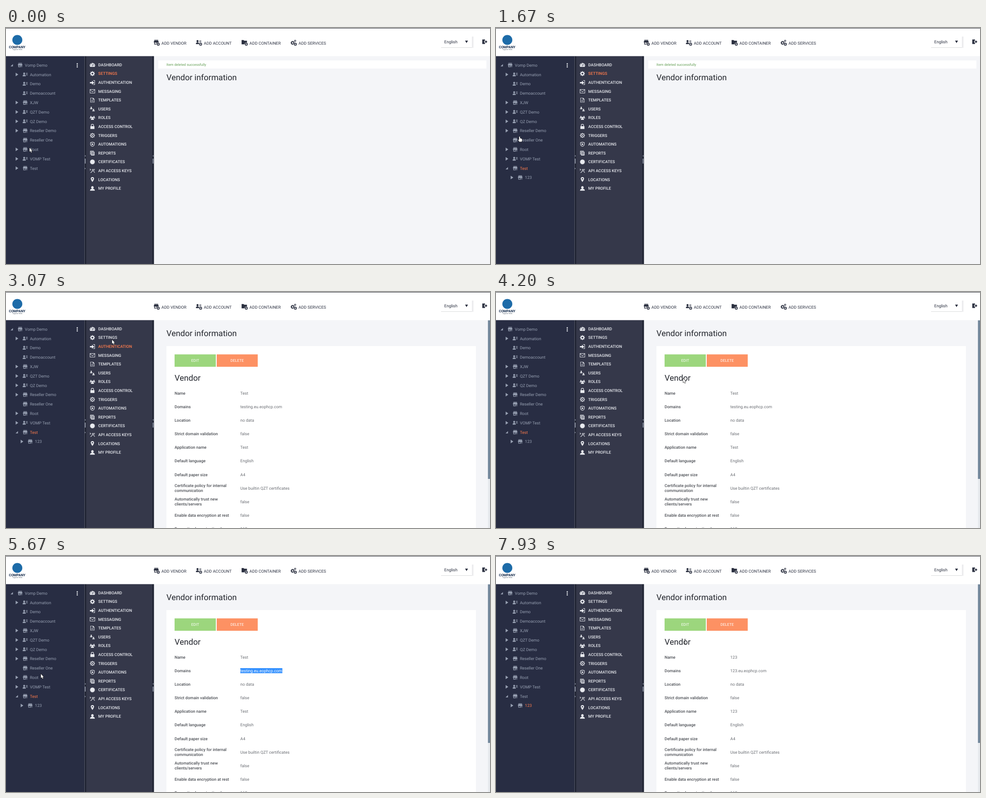
These frames come from a looping animation (1068 px wide and 524 px high, 8000 ms). An HTML page with a canvas:

```html
<!DOCTYPE html>
<html lang="en">
<head>
<meta charset="utf-8">
<title>Vendor console</title>
<style>
html, body { margin: 0; width: 100%; height: 100%; overflow: hidden; background: #f4f5f8; }
canvas { display: block; }
</style>
</head>
<body>
<canvas id="stage" width="1068" height="524"></canvas>
<script>
const ctx = document.getElementById('stage').getContext('2d');
ctx.textRendering = 'geometricPrecision';
const LOOP = 8000, FPS = 15;
const ORANGE = '#ff7c4d', TREE = '#97a0b2', MENU = '#e8eaef', DARK = '#2b3040';
const TOP = 62.5;

// When things switch, in ms
const EXPAND = 1200, OPEN = 2260, PICK = 6260, RELOAD = 6590;
const DRAG = [4530, 4860];

// Pointer track: time, x, y, shape
const track = [
  [0, 52, 266, 'arrow'], [133, 54, 247, 'hand'], [267, 54, 247, 'hand'],
  [600, 23, 244, 'hand'], [733, 23, 244, 'hand'], [1000, 17, 242, 'hand'],
  [1133, 17, 242, 'hand'], [1667, 52, 241, 'hand'], [2667, 52, 241, 'arrow'],
  [2800, 84, 195, 'arrow'], [2933, 148, 115, 'arrow'], [3000, 190, 90, 'arrow'],
  [3067, 234, 106, 'arrow'], [3200, 350, 153, 'arrow'], [3333, 350, 153, 'arrow'],
  [3733, 407, 192, 'arrow'], [3867, 408, 192, 'arrow'], [4133, 408, 192, 'arrow'],
  [4200, 413, 192, 'arrow'], [4400, 415, 203, 'beam'], [4533, 415, 203, 'beam'],
  [4867, 489, 203, 'beam'], [5067, 489, 202, 'arrow'], [5133, 465, 193, 'arrow'],
  [5333, 143, 230, 'arrow'], [5467, 143, 230, 'arrow'], [5667, 77, 262, 'arrow'],
  [5867, 59, 260, 'hand'], [6000, 60, 255, 'hand'], [7333, 60, 255, 'arrow'],
  [7533, 424, 214, 'arrow'], [7600, 424, 214, 'arrow'], [7667, 426, 212, 'arrow'],
  [7933, 417, 190, 'beam']
];

function pointerAt(t) {
  let i = track.length - 1;
  while (i > 0 && track[i][0] > t + 2) i--;
  const a = track[i], b = track[i + 1] || a;
  const k = b === a ? 0 : Math.max(0, (t - a[0]) / (b[0] - a[0]));
  return { x: a[1] + (b[1] - a[1]) * k, y: a[2] + (b[2] - a[2]) * k, kind: a[3] };
}

function box(x, y, w, h, color) {
  ctx.fillStyle = color;
  ctx.fillRect(x, y, w, h);
}

// y is the middle of the capitals
function text(s, x, y, color, size = 9.05, weight = 400, align = 'left') {
  ctx.font = `${weight} ${size}px Roboto, sans-serif`;
  ctx.textAlign = align;
  ctx.fillStyle = color;
  ctx.fillText(s, x, y + size * 0.356);
}

function poly(color, ...p) {
  ctx.fillStyle = color;
  ctx.beginPath();
  for (let i = 0; i < p.length; i += 2) ctx.lineTo(p[i], p[i + 1]);
  ctx.fill();
}

function shape(d, x, y, color, scale = 1, outline) {
  const path = new Path2D(d);
  ctx.save();
  ctx.translate(x, y);
  ctx.scale(scale, scale);
  if (outline) {
    ctx.strokeStyle = outline;
    ctx.lineWidth = 1.2;
    ctx.lineJoin = 'round';
    ctx.stroke(path);
  }
  ctx.fillStyle = color;
  ctx.fill(path, 'evenodd');
  ctx.restore();
}

function disc(x, y, r, color) {
  ctx.fillStyle = color;
  ctx.beginPath();
  ctx.arc(x, y, r, 0, 7);
  ctx.fill();
}

function gear(x, y, r, teeth, hole, color, depth = 0.74) {
  ctx.fillStyle = color;
  ctx.beginPath();
  for (let i = 0; i < teeth * 4; i++) {
    const a = (i - 0.5) * Math.PI / teeth / 2;
    const q = i % 4 < 2 ? r : r * depth;
    ctx.lineTo(x + q * Math.cos(a), y + q * Math.sin(a));
  }
  ctx.closePath();
  if (hole) {
    ctx.moveTo(x + hole, y);
    ctx.arc(x, y, hole, 0, 7);
  }
  ctx.fill('evenodd');
}

const P = {
  store: 'M-4-4.8H4V-3.8H-4ZM-4-3.2H4L5-.8V.4H-5V-.8ZM-4.2.4H4.2V4.6H3V1H1.6V4.6H-4.2ZM-3 1V3.2H.4V1Z',
  account: 'M-2.2-4.4a2.1 2.3 0 1 1-.01 0ZM-5.5 4V2.6Q-5.3.6-2.2.4Q1 .6 1.2 2.6V4ZM1.5-3.5H5.5V-2.5H1.5ZM1.5-1.4H5.5V-.4H1.5ZM2 .7H5.5V1.7H2Z',
  person: 'M0-5.2a2.8 3 0 1 1-.01 0ZM-5.2 5.2V3.6Q-4.8 1.4-1.6.9H1.6Q4.8 1.4 5.2 3.6V5.2Z',
  folder: 'M-5.5-4.5H-1.5L0-3H5.5V4.5H-5.5Z',
  gauge: 'M-5 4.5A5.8 5.6 0 1 1 5 4.5ZM-.8 2.8H.8L2-2.2L1.2-2.4ZM-4.2-.2h1.4v1.4h-1.4ZM-2.8-3.2h1.4v1.4h-1.4ZM3-.2h1.4v1.4H3Z',
  enter: 'M-5.5-1H-1V-4L4 .5L-1 5V2H-5.5ZM1.5-5H5.5V5.4H1.5V4.4H4.5V-4H1.5Z',
  mail: 'M-5.8-4.5H5.8V4.5H-5.8ZM-4.9-3.6V3.6H4.9V-3.6ZM-4.9-3.6L0 .6L4.9-3.6V-2.4L0 1.8L-4.9-2.4Z',
  doc: 'M-4.5-5.2H1.5L4.5-2.2V5.2H-4.5ZM-3.6-4.3V4.3H3.6V-1.6H.8V-4.3ZM-2.4-.4H2.4V.5H-2.4ZM-2.4 1.8H2.4V2.7H-2.4Z',
  lock: 'M-4.5-.8H4.5V5.4H-4.5ZM-3.2-.8V-2.6A3.2 3.2 0 0 1 3.2-2.6V-.8H2V-2.6A2 2 0 0 0-2-2.6V-.8Z',
  play: 'M-4.8-4.2L0-5.4L4.8-4.2V1Q4 4.2 0 5.4Q-4 4.2-4.8 1ZM-3.7-3.2V.8Q-3 3.4 0 4.3Q3 3.4 3.7.8V-3.2L0-4.2ZM-1.6-2.6L2.6 0L-1.6 2.6Z',
  report: 'M-5-5H3V-3.8H-3.8V3.4H-5ZM-3-3H4.6V5.2H-3ZM-1.8-1.6V-.7H3.4V-1.6ZM-1.8.4V1.3H3.4V.4ZM-1.8 2.4V3.3H3.4V2.4Z',
  keys: 'M-5.6-4.6L-2.8-2.4L-5.6-.2V-1.6L-4.4-2.4L-5.6-3.2ZM1.2-3.6a2.2 2.2 0 1 1-.01 0ZM1.2-2.5a1.1 1.1 0 1 0 .01 0ZM.2-.2L1 .5L-3.6 5L-4.4 4.2ZM2.8.4L5.6 3.8L4.8 4.6L2 1.2ZM4-4.2H5V-1H4Z',
  pin: 'M0-5.4A3.6 3.6 0 0 1 3.6-1.8Q3.2 1.6 0 5.6Q-3.2 1.6-3.6-1.8A3.6 3.6 0 0 1 0-5.4ZM0-3.3a1.5 1.5 0 1 0 .01 0Z',
  exit: 'M-5.5-5H.5V-2H-1.5V2H.5V5H-5.5ZM-.5-1H2V-3.4L5.6 0L2 3.4V1H-.5Z',
  arrow: 'M0 0V8.8L2 7L3.6 10.4L5 9.8L3.5 6.5H6.2Z',
  hand: 'M-1 1Q-1 0 0 0T1 1V4Q2 3.6 2.6 4.4Q3.6 4 4 4.9Q5.4 4.8 5.5 6V8.4Q5.4 10.2 4.4 11.6H-.6Q-2 9.4-3 7.4Q-2.8 6-1 7.4Z'
};

const menu = [
  ['DASHBOARD', 'gauge'], ['SETTINGS', (x, y, c) => gear(x, y, 5.5, 8, 1.9, c)],
  ['AUTHENTICATION', 'enter'], ['MESSAGING', 'mail'], ['TEMPLATES', 'doc'],
  ['USERS', (x, y, c) => {
    shape(P.person, x - 2.6, y - 2.2, c, 0.52);
    shape(P.person, x + 2.4, y + 2.4, c, 0.52);
  }],
  ['ROLES', (x, y, c) => {
    shape(P.person, x - 3.4, y - 1.4, c, 0.5);
    shape(P.person, x + 3.4, y - 1.4, c, 0.5);
    shape(P.person, x, y + 1.2, c, 0.68);
  }],
  ['ACCESS CONTROL', 'lock'],
  ['TRIGGERS', (x, y, c) => {
    gear(x, y, 5.6, 8, 3, c);
    poly(c, x - 1.4, y - 2, x + 2, y, x - 1.4, y + 2);
  }],
  ['AUTOMATIONS', 'play'], ['REPORTS', 'report'],
  ['CERTIFICATES', (x, y, c) => gear(x, y, 5.7, 14, 0, c, 0.84)],
  ['API ACCESS KEYS', 'keys'], ['LOCATIONS', 'pin'], ['MY PROFILE', 'person']
];

// label, depth, icon, branch
const tree = [
  ['Vomp Demo', 0, 'store', 'open'], ['Automation', 1, 'account', 'shut'],
  ['Demo', 1, 'account'], ['Demoaccount', 1, 'account'], ['XJW', 1, 'store', 'shut'],
  ['QZT Demo', 1, 'account', 'shut'], ['QZ Demo', 1, 'account', 'shut'],
  ['Reseller Demo', 1, 'store', 'shut'], ['Reseller One', 1, 'store'],
  ['Root', 1, 'store', 'shut'], ['VOMP Test', 1, 'account', 'shut'],
  ['Test', 1, 'store', 'shut'], ['123', 2, 'store', 'shut']
];

function drawHeader() {
  box(0, 0, 1068, TOP, '#fff');
  box(0, 0, 1068, 1, '#3d3f45');
  disc(25, 26.5, 11, '#1d6ba8');
  text('COMPANY', 24.5, 42.7, '#12294a', 7.6, 700, 'center');
  text('Tagline Here', 25, 47.8, '#55606e', 4, 400, 'center');

  const actions = [['ADD VENDOR', 343], ['ADD ACCOUNT', 436.5],
    ['ADD CONTAINER', 537.3], ['ADD SERVICES', 645.5]];
  actions.forEach(([label, x], i) => {
    const ix = x - 11.5;
    text(label, x, 33.8, DARK);
    if (i < 3) shape(P[['store', 'account', 'folder'][i]], ix, 31.5, DARK, 1.08);
    else {
      gear(ix - 1.5, 33, 4.6, 8, 1.7, DARK);
      gear(ix + 4, 28.5, 2.5, 7, 0.9, DARK);
    }
    const bx = ix + 4.5, by = 36;
    disc(bx, by, 3.8, '#fff');
    disc(bx, by, 3.2, DARK);
    box(bx - 2, by - 0.4, 4, 0.9, '#fff');
    box(bx - 0.4, by - 2, 0.9, 4, '#fff');
  });

  box(960, 43, 68, 1, '#d9dadc');
  box(1028, 19, 3.5, 25, '#ececee');
  text('English', 967, 30.7, DARK);
  poly(DARK, 1013, 28, 1019.5, 28, 1016.2, 33.5);
  shape(P.exit, 1056.5, 30.5, DARK);
}

function drawTree(t) {
  box(0, TOP, 173.5, 462, '#282d43');
  tree.forEach(([label, depth, icon, branch], i) => {
    if (i === 12 && t < EXPAND) return;
    const x = 13 + depth * 11.1, y = 82.4 + i * 20.8;
    const hot = i === 11 ? (t > 330 && t < 530) || (t >= 1530 && t < PICK)
      : i === 12 && t >= 5860;
    const open = branch === 'open' || (i === 11 && t >= EXPAND);
    if (open) poly(TREE, x - 3, y + 2.8, x + 2.3, y + 2.8, x + 2.3, y - 2.5);
    else if (branch) poly(TREE, x - 2.8, y - 4, x + 3, y, x - 2.8, y + 4);
    shape(P[icon], x + 18.2, y, TREE);
    text(label, x + 28.6, y + 0.2, hot ? ORANGE : TREE);
  });
  for (let i = -1; i < 2; i++) disc(157.2, 82.8 + i * 3.6, 1.3, '#eef0f4');
}

function drawMenu(t) {
  box(177, TOP, 146, 462, '#35384a');
  // Highlight trails the pointer by one step
  const p = pointerAt(t - 1000 / FPS), px = p.x / 0.8, py = p.y / 0.8;
  const over = px > 177 && px < 323 ? Math.floor((py - 71.9) / 19.6) : -1;
  menu.forEach(([label, icon], i) => {
    const y = 81.7 + i * 19.6;
    const hot = i === over || (i === 1 && t < OPEN);
    if (typeof icon === 'string') shape(P[icon], 190.7, y, MENU);
    else icon(190.7, y, MENU);
    text(label, 203.6, y, hot ? ORANGE : MENU, 8.95, 500);
  });
}

function drawSplitters() {
  box(173.5, TOP, 3.5, 462, '#1f2332');
  box(323, TOP, 3.5, 462, '#1f2332');
  for (const x of [174.8, 324.6]) {
    box(x - 1, 290, 2, 11, '#8a92a3');
    poly('#8a92a3', x + 1, 282, x - 1.2, 284, x + 1, 286);
  }
  poly('#8a92a3', 173.8, 310, 176, 312, 173.8, 314);
}

function drawDetails(t) {
  box(1063.5, 62, 4.5, 462, '#e6e9ed');
  box(1063.5, 63, 4.5, 352, '#71869a');
  text('Vendor information', 354, 92, '#23262d', 18.1);
  box(354, 120, 683, 404, '#fff');
  box(372, 138.5, 91, 27.5, '#9cd67d');
  box(465, 138.5, 90.5, 27.5, '#fd9163');
  text('EDIT', 417.5, 152.2, '#fff', 8.4, 400, 'center');
  text('DELETE', 510, 152.2, '#fff', 8.4, 400, 'center');
  text('Vendor', 372, 190.5, '#23262d', 18.1);

  const name = t < RELOAD ? 'Test' : '123';
  const domain = t < RELOAD ? 'testing.eu.eophcp.com' : '123.eu.eophcp.com';
  const rows = [
    ['Name', name], ['Domains', domain], ['Location', 'no data'],
    ['Strict domain validation', 'false'], ['Application name', name],
    ['Default language', 'English'], ['Default paper size', 'A4'],
    ['Certificate policy for internal|communication', 'Use builtin QZT certificates'],
    ['Automatically trust new|clients/servers', 'false'],
    ['Enable data encryption at rest', 'false'],
    ['Encryption key retention, hours', '168']
  ];
  rows.forEach(([label, value], i) => {
    const y = 225 + i * 30.05, lines = label.split('|');
    lines.forEach((s, n) =>
      text(s, 372, y + (n - (lines.length - 1) / 2) * 10.6, '#4c4f55', 9, 500));
    text(value, 517, y, '#6b6e74');
  });

  if (t >= DRAG[0] && t < PICK) {
    const k = Math.min(1, (t - DRAG[0]) / (DRAG[1] - DRAG[0]));
    ctx.save();
    ctx.beginPath();
    ctx.rect(517, 249, 92.8 * k, 11.2);
    ctx.clip();
    box(517, 249, 93, 12, '#3390ff');
    text(domain, 517, 255.05, '#fff');
    ctx.restore();
  }
}

function drawMain(t) {
  box(326.5, 62, 742, 462, '#f4f5f8');
  if (t >= OPEN) return drawDetails(t);
  box(336, 72, 724, 18, '#fff');
  text('Item deleted successfully', 354, 81.2, '#66a058', 7.75);
  text('Vendor information', 354, 110, '#23262d', 18.1);
}

function drawPointer(t) {
  const { x, y, kind } = pointerAt(t);
  if (kind !== 'beam') return shape(P[kind], x, y, '#fff', 1, '#1a1a1a');
  box(x - 0.5, y - 5, 1, 10, '#333');
  box(x - 2.5, y - 5.5, 5, 1, '#555');
  box(x - 2.5, y + 4.5, 5, 1, '#555');
}

let last = -1;
function frame() {
  const step = Math.floor((performance.now() % LOOP) * FPS / 1000 + 0.12) % (LOOP * FPS / 1000);
  if (step !== last) {
    last = step;
    const t = step * 1000 / FPS;
    ctx.clearRect(0, 0, 1068, 524);
    drawMain(t);
    drawHeader();
    drawTree(t);
    drawMenu(t);
    drawSplitters();
    drawPointer(t);
  }
  requestAnimationFrame(frame);
}
frame();
</script>
</body>
</html>
```
